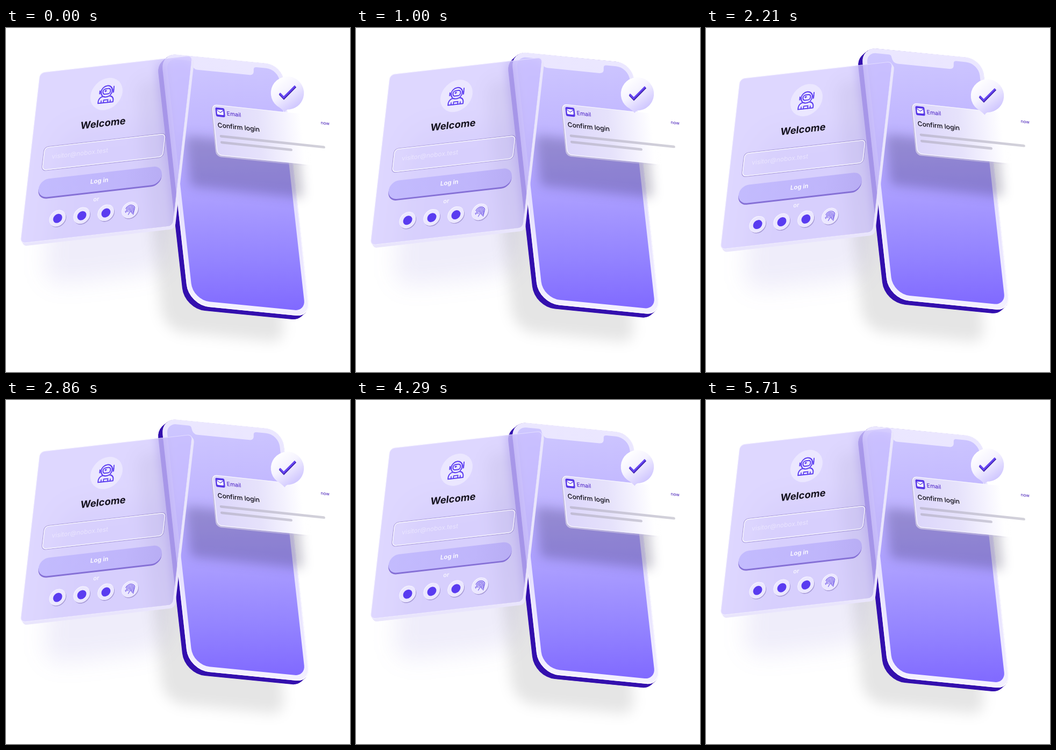
Animation of 640 by 640 pixels, one loop 5.78 s. Source, as an HTML page with a canvas:

```html
<!DOCTYPE html>
<html lang="en">
<head>
<meta charset="utf-8">
<title>Passwordless login</title>
<style>
html, body { margin: 0; width: 100%; height: 100%; overflow: hidden; background: #fff; }
canvas { display: block; width: 640px; height: 640px; }
</style>
</head>
<body>
<canvas id="stage" width="640" height="640"></canvas>
<script>
const canvas = document.getElementById('stage');
const ctx = canvas.getContext('2d');
const LOOP = 5780, STEPS = 81;
const INK = '#5a3cf0';

// Each surface is a skewed plane: [xx, xy, yx, yy, originX, originY]
const PANEL = [0.9936, -0.113, -0.114, 0.9935, 63, 83];
const PHONE = [0.995, 0.0983, 0.1105, 0.993, 288, 46.5];
const NOTE = [0.9945, 0.105, 0.105, 0.9945, 383, 142];

function rounded(x, y, w, h, r) {
  const p = new Path2D();
  p.roundRect(x, y, w, h, r);
  return p;
}

function placed(path, plane, dx, dy) {
  const m = new DOMMatrix(plane);
  m.e += dx;
  m.f += dy;
  const p = new Path2D();
  p.addPath(path, m);
  return p;
}

function onPlane(plane, dx, dy, draw) {
  ctx.save();
  ctx.transform(...plane);
  ctx.translate(0, 0);
  draw();
  ctx.restore();
}

function lifted(dy, draw) {
  ctx.save();
  ctx.translate(0, dy);
  draw();
  ctx.restore();
}

function gradient(x0, y0, x1, y1, ...stops) {
  const g = ctx.createLinearGradient(x0, y0, x1, y1);
  stops.forEach(([at, color]) => g.addColorStop(at, color));
  return g;
}

function fill(path, style) {
  ctx.fillStyle = style;
  ctx.fill(path);
}

function stroke(path, style, width) {
  ctx.strokeStyle = style;
  ctx.lineWidth = width;
  ctx.stroke(path);
}

function line(style, width, ...points) {
  const p = new Path2D();
  points.forEach(([x, y], i) => i ? p.lineTo(x, y) : p.moveTo(x, y));
  stroke(p, style, width);
}

function disc(x, y, r, style) {
  const p = new Path2D();
  p.arc(x, y, r, 0, 7);
  fill(p, style);
}

function text(str, x, y, size, weight, style, align = 'left') {
  ctx.font = `${weight} ${size}px Inter, sans-serif`;
  ctx.textAlign = align;
  ctx.fillStyle = style;
  ctx.fillText(str, x, y);
}

function blurred(path, style, radius) {
  ctx.save();
  ctx.filter = `blur(${radius}px)`;
  fill(path, style);
  ctx.restore();
}

const phoneBody = rounded(0, 0, 227, 472, [30, 30, 26, 38]);
const panelFace = rounded(0, 0, 286, 320, 9);
const noteFace = rounded(0, 0, 212, 95, 9);

const screen = new Path2D();
screen.moveTo(28, 9);
screen.lineTo(51, 9);
screen.quadraticCurveTo(56, 9, 56, 14);
screen.quadraticCurveTo(57, 25, 66, 25);
screen.lineTo(163, 25);
screen.quadraticCurveTo(172, 25, 172, 15);
screen.quadraticCurveTo(172, 9, 178, 9);
screen.lineTo(196, 9);
screen.arcTo(219, 9, 219, 32, 23);
screen.lineTo(219, 442);
screen.arcTo(219, 462, 199, 462, 20);
screen.lineTo(40, 462);
screen.arcTo(9, 462, 9, 430, 31);
screen.lineTo(9, 28);
screen.arcTo(9, 9, 28, 9, 19);

function drawPhone(dy) {
  for (let i = 16; i > 0; i--) {
    fill(placed(phoneBody, PHONE, -i / 2, dy + i * 0.44), '#3410ae');
  }
  lifted(dy, () => onPlane(PHONE, 0, 0, () => {
    fill(phoneBody, gradient(0, 0, 0, 472, [0, '#ebe7ff'], [0.6, '#e6e1ff'], [1, '#f3f0ff']));
    stroke(rounded(0.8, 0.8, 225.4, 470.4, [29, 29, 25, 37]),
      gradient(0, 0, 0, 472, [0, 'rgba(255,255,255,.1)'], [1, 'rgba(255,255,255,.9)']), 1.6);
    fill(screen, gradient(90, 0, 150, 470,
      [0, '#cec7ff'], [0.25, '#c2b8ff'], [0.55, '#ab9eff'], [0.8, '#9383ff'], [1, '#8069ff']));
  }));
}

function drawAvatar() {
  disc(131, 55, 30, '#ebe7ff');
  ctx.save();
  ctx.translate(131, 55);
  ctx.lineCap = ctx.lineJoin = 'round';
  const helmet = new Path2D();
  helmet.arc(0, -5, 10.5, 2.35, 7.07);
  stroke(helmet, INK, 2);
  stroke(rounded(-7, -10, 14, 10, 4.5), INK, 2);
  line(INK, 1.6, [-3.5, -6], [-0.5, -6]);
  line(INK, 1.6, [-2, -7.5], [-2, -4.5]);
  line(INK, 2.2, [-12.8, -7], [-12.8, -2]);
  line(INK, 2.2, [12.8, -7], [12.8, -2]);
  line(INK, 1.8, [12.8, -7], [12.8, -13]);
  const body = new Path2D();
  body.moveTo(-14, 16);
  body.lineTo(-14, 12);
  body.quadraticCurveTo(-13, 5, -6, 4);
  body.quadraticCurveTo(0, 7, 6, 4);
  body.quadraticCurveTo(13, 5, 14, 12);
  body.lineTo(14, 16);
  body.lineTo(-14, 16);
  stroke(body, INK, 2);
  line(INK, 1.8, [-8.5, 12], [-8.5, 16]);
  line(INK, 1.8, [8.5, 12], [8.5, 16]);
  line(INK, 1.8, [-4, 16], [-4, 11], [4, 11], [4, 16]);
  ctx.restore();
}

function drawFingerprint(x, y) {
  ctx.save();
  ctx.translate(x, y);
  ctx.lineCap = 'round';
  [[9, 3.5, 5.9], [6.7, 2.7, 6.7], [4.4, 2.4, 7], [2.1, 2.9, 6.7]].forEach(([r, from, to]) => {
    const p = new Path2D();
    p.arc(0, -0.5, r, from, to);
    p.lineTo(r * 0.75, 2 + r * 0.75);
    stroke(p, '#745ce8', 1.2);
  });
  line('#745ce8', 1.2, [0, -0.5], [-0.5, 4], [-2.5, 8]);
  line('#745ce8', 1.2, [-8.6, 1], [-7.8, 3.5]);
  ctx.restore();
}

function drawForm() {
  drawAvatar();
  text('Welcome', 131, 116, 18.5, 700, '#15121d', 'center');

  stroke(rounded(24.5, 142, 228, 45, 8), 'rgba(125,108,190,.6)', 1);
  stroke(rounded(25.8, 143.3, 225.4, 42.4, 7), 'rgba(255,255,255,.85)', 1.4);
  text('visitor@nobox.test', 41, 166, 12, 400, 'rgba(240,236,255,.75)');

  fill(rounded(23, 206, 230.5, 34.5, 17.2), '#8570d6');
  fill(rounded(23, 203, 230.5, 34.5, 17.2),
    gradient(23, 0, 253, 0, [0, '#c3bbfe'], [0.7, '#bfb5fb'], [1, '#b8adf4']));
  text('Log in', 136.5, 222, 11.6, 600, '#fff', 'center');
  text('or', 134.5, 256, 11, 500, 'rgba(255,255,255,.9)', 'center');

  for (let i = 0; i < 4; i++) {
    const x = 65.5 + i * 45.2, y = 280.5;
    disc(x + 1, y + 1.4, 15.3, '#a99dd8');
    disc(x - 0.4, y - 0.4, 15.3, '#fff');
    disc(x, y, 15, '#ebe7ff');
    if (i < 3) disc(x, y, 8.5, INK);
    else drawFingerprint(x, y);
  }
}

function drawPanel(dy) {
  const face = placed(panelFace, PANEL, 0, dy);

  ctx.save();
  ctx.clip(face);
  ctx.globalAlpha = 0.6;
  ctx.filter = 'blur(9px)';
  ctx.drawImage(canvas, 0, 0);
  ctx.restore();
  fill(face, 'rgba(200,189,255,.6)');

  const around = new Path2D();
  around.rect(0, 0, 640, 640);
  around.addPath(face);
  ctx.save();
  ctx.clip(around, 'evenodd');
  for (let i = 1; i <= 4; i++) {
    fill(placed(panelFace, PANEL, i * 0.9, dy + i * 1.3), '#e9e5fc');
  }
  ctx.restore();

  lifted(dy, () => onPlane(PANEL, 0, 0, () => {
    stroke(rounded(0.5, 0.5, 285, 319, 8.5), 'rgba(255,255,255,.45)', 1);
    drawForm();
  }));
}

function drawNote(dy) {
  const fade = (r, g, b, a) => gradient(0, 0, 212, 0,
    [0, `rgba(${r},${g},${b},${a})`], [0.55, `rgba(${r},${g},${b},${a * 0.6})`], [0.8, `rgba(${r},${g},${b},0)`]);

  lifted(dy, () => onPlane(NOTE, 0, 0, () => {
    fill(rounded(-2.5, 1, 212, 97, 9), fade(196, 189, 226, 1));
    fill(noteFace, gradient(0, 0, 212, 0,
      [0, '#dcd6fb'], [0.4, '#e6e2fb'], [0.62, '#f4f2fe'], [0.78, '#ffffff'], [1, 'rgba(255,255,255,0)']));
    stroke(rounded(0.5, 0.5, 211, 94, 8.5), fade(255, 255, 255, 0.9), 1.2);

    fill(rounded(5.7, 5, 17, 17, 3), '#5636e6');
    fill(rounded(8.2, 8.7, 12, 9.4, 1.5), '#fff');
    ctx.lineJoin = 'round';
    line('#5636e6', 1.1, [8.4, 9.8], [14.2, 14], [20, 9.8]);
    text('Email', 26.3, 18, 10.6, 400, '#4419c4');
    text('Confirm login', 6.6, 42.2, 12.2, 500, '#08060f');
    text('now', 202.5, 15.8, 8.2, 400, '#3c12b4');

    ctx.lineCap = 'round';
    const bar = gradient(8, 0, 206, 0, [0, '#c1bcd6'], [1, '#d3d2da']);
    line(bar, 4.8, [11, 58.6], [203.5, 58.6]);
    line(bar, 4.8, [11, 70.2], [141, 70.2]);
  }));
}

function drawBubble(dy) {
  lifted(dy, () => {
    const shape = new Path2D();
    shape.arc(523.5, 121, 30.8, 2.05, 7.85);
    shape.quadraticCurveTo(520, 153, 518.5, 156.5);
    shape.quadraticCurveTo(516.5, 154, 509.3, 148.3);
    fill(shape, gradient(506, 95, 546, 148,
      [0, '#ffffff'], [0.4, '#f5f3ff'], [0.75, '#dcd5ff'], [1, '#cbc2ff']));
    ctx.lineCap = 'butt';
    ctx.lineJoin = 'miter';
    line('#3d1fae', 4.4, [509.3, 122.6], [517, 130.7], [538.6, 108.8]);
    line('#6646f2', 3.2, [509, 121.4], [516.6, 129.2], [538, 107.8]);
  });
}

function render(now) {
  const step = Math.floor((now % LOOP + 5) * STEPS / LOOP) % STEPS;
  const swing = (1 - Math.cos(2 * Math.PI * step / STEPS)) / 2;

  ctx.clearRect(0, 0, 640, 640);
  ctx.fillStyle = '#fff';
  ctx.fillRect(0, 0, 640, 640);

  blurred(placed(phoneBody, PHONE, -47, 48), 'rgba(0,0,0,.1)', 12);
  blurred(placed(rounded(0, 0, 230, 290, 40), PANEL, 38, 108 + 13 * swing), 'rgba(100,80,200,.1)', 22);
  drawPhone(-13 * swing);
  blurred(placed(rounded(0, 0, 212, 95, 9), NOTE, -50, 58 - 3 * swing), 'rgba(25,15,60,.23)', 10);
  drawPanel(13 * swing);
  drawNote(-3 * swing);
  drawBubble(6 * swing);
}

function tick() {
  render(performance.now());
  requestAnimationFrame(tick);
}
tick();
</script>
</body>
</html>
```
